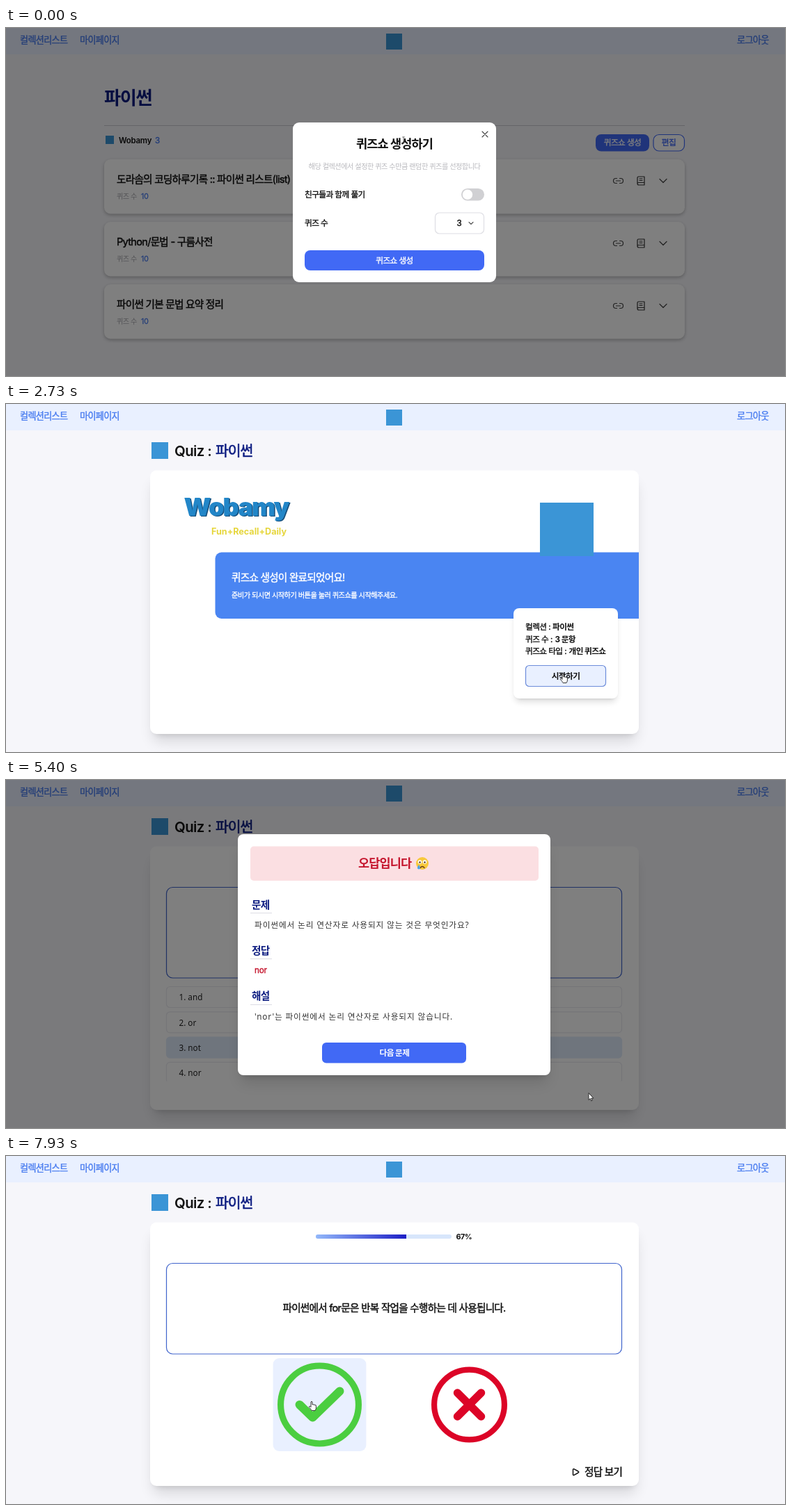
An HTML page with a canvas that plays this animation: 1119x501 px, repeating every 8 s.

```html
<!DOCTYPE html>
<html lang="ko">
<head>
<meta charset="utf-8">
<style>
html, body { margin: 0; width: 100%; height: 100%; overflow: hidden; background: #f6f6fa; }
canvas { display: block; }
</style>
</head>
<body>
<canvas id="stage" width="1119" height="501"></canvas>
<script>
const c = document.getElementById('stage').getContext('2d');
const LOOP = 8000;
const UI = 'Inter, "Noto Sans CJK KR", sans-serif';
const PLAIN = '"Noto Sans", "Noto Sans CJK KR", sans-serif';
const BLUE = '#4169f5', LINK = '#4a7df0', NAVY = '#0b1b80', PALE = '#e9f0ff', EDGE = '#4064cc', MASCOT = '#3b95d6';

// When each screen takes over
const READY = 1330, QUIZ = 2950, ANSWER = 5300, NEXT = 6060;
// When the pointer is over each of the two answer marks
const OVER_X = [6510, 6935], OVER_CHECK = [7070, LOOP + 500];

// Cursor stops: time, x, y of the tip
const stops = [
  [0, 571, 161], [200, 571, 161], [850, 566, 330], [1330, 566, 332], [1800, 775.5, 366.5],
  [2200, 800, 388], [2900, 800, 388], [3470, 663, 370], [3800, 660, 379], [4400, 660, 379],
  [5000, 837, 451], [5430, 837, 451], [5930, 543.5, 384], [6300, 543.5, 384],
  [6700, 645, 360], [6780, 645, 360], [7280, 439, 353], [LOOP, 439, 353]
];
const handTimes = [[800, READY], [2000, 4500], [4930, ANSWER], [5750, NEXT], OVER_X, OVER_CHECK];

const clamp = v => Math.min(1, Math.max(0, v));
const ease = v => { v = clamp(v); return v * v * (3 - 2 * v); };

// Weight 500 is regular type with a thin outline
function text(str, x, y, size, color, o = {}) {
  const { weight = 500, align = 'left', gap = -0.05, font = UI } = o;
  c.font = `${weight === 500 ? 400 : weight} ${size}px ${font}`;
  c.letterSpacing = size * gap + 'px';
  c.textAlign = align;
  c.fillStyle = c.strokeStyle = color;
  c.fillText(str, x, y + size * 0.36);
  if (weight === 500) {
    c.lineWidth = size * 0.03;
    c.lineJoin = 'round';
    c.strokeText(str, x, y + size * 0.36);
  }
}

function box(x0, y0, x1, y1, r, fill, stroke, shadow) {
  c.save();
  c.beginPath();
  c.roundRect(x0, y0, x1 - x0, y1 - y0, r);
  if (shadow) {
    c.shadowColor = `rgba(0,0,0,${shadow[2]})`;
    c.shadowOffsetY = shadow[0];
    c.shadowBlur = shadow[1];
  }
  if (fill) { c.fillStyle = fill; c.fill(); }
  if (stroke) { c.strokeStyle = stroke; c.lineWidth = 1.2; c.stroke(); }
  c.restore();
}

// White panel with a wide and a tight shadow, both pulled in at the sides
function panel(x0, y0, x1, y1, r, lift) {
  for (const [inset, drop, blur] of [[0.25, 1, 1.25], [0.3, 0.4, 0.5]]) {
    const n = inset * lift;
    box(x0 + n, y0 + n, x1 - n, y1 - n, r, '#fff', null, [drop * lift, blur * lift, 0.12]);
  }
  box(x0, y0, x1, y1, r, '#fff');
}

function path(d, x, y, color, width, fill) {
  const p = new Path2D(d);
  c.save();
  c.translate(x, y);
  c.lineCap = c.lineJoin = 'round';
  if (fill) { c.fillStyle = fill; c.fill(p); }
  if (width) { c.strokeStyle = color; c.lineWidth = width; c.stroke(p); }
  c.restore();
}

function disc(x, y, r, fill) {
  c.beginPath();
  c.arc(x, y, r, 0, 7);
  c.fillStyle = fill;
  c.fill();
}

function dim() {
  c.fillStyle = 'rgba(0,0,0,.5)';
  c.fillRect(0, 0, 1119, 501);
}

function page() {
  c.fillStyle = '#f6f6fa';
  c.fillRect(0, 0, 1119, 501);
  c.fillStyle = PALE;
  c.fillRect(0, 0, 1119, 38);
  text('컬렉션리스트', 20, 17, 13.1, LINK);
  text('마이페이지', 106, 17, 13.1, LINK);
  text('로그아웃', 1050, 17, 13.1, LINK);
  box(546, 8, 569, 31, 0, MASCOT);
}

function collection() {
  page();
  text('파이썬', 141, 101, 26.2, NAVY, { weight: 700 });
  c.fillStyle = '#c9c9d0';
  c.fillRect(141, 140, 834, 1);
  box(143, 155, 155, 167, 0, MASCOT);
  text('Wobamy', 162, 161.5, 11.4, '#111', { weight: 600, gap: -0.02 });
  text('3', 214, 161.5, 11.7, LINK);
  box(847, 153, 924, 177.5, 8, BLUE);
  text('퀴즈쇼 생성', 885.5, 165, 11.7, '#fff', { align: 'center' });
  box(930, 153.5, 974.5, 177, 8, '#fff', BLUE);
  text('편집', 952, 165, 11.7, BLUE, { align: 'center' });
  ['도라솜의 코딩하루기록 :: 파이썬 리스트(list)', 'Python/문법 - 구름사전', '파이썬 기본 문법 요약 정리'].forEach((title, i) => {
    const y = 189 + i * 90;
    box(141, y, 975, y + 78.5, 9, '#fff', null, [2, 5, 0.25]);
    text(title, 159, y + 28.5, 14.6, '#111');
    text('퀴즈 수', 159, y + 53, 10.2, '#a8a8ae', { weight: 400 });
    text('10', 194, y + 53, 10.4, LINK, { gap: 0 });
    path('M-2-3.5h-1.5a3.5 3.5 0 0 0 0 7H-2M2-3.5h1.5a3.5 3.5 0 0 1 0 7H2M-3 0H3', 879.5, y + 31, '#444', 1.2);
    path('M-5 4V-4.5Q-5-6-3.5-6H5V6H-3Q-5 6-5 4Q-5 2.5-3 2.5H5M-2-3H2M-2-.5H2', 912, y + 31, '#333', 1.2);
    path('M-5-2.5L0 2.5L5-2.5', 944, y + 31, '#444', 1.2);
  });
  dim();
  box(412, 136, 704, 366, 9, '#fff');
  path('M-4-4L4 4M4-4L-4 4', 688, 153, '#444', 1.1);
  text('퀴즈쇼 생성하기', 558, 167, 17.5, '#111', { weight: 700, align: 'center' });
  text('해당 컬렉션에서 설정한 퀴즈 수만큼 랜덤한 퀴즈를 선정합니다', 558, 199.5, 10.2, '#b9b9be', { weight: 400, align: 'center' });
  text('친구들과 함께 풀기', 429, 239.5, 11.7, '#111');
  box(654, 231, 687, 248.5, 9, '#d0d0d3');
  disc(663, 239.8, 7.2, '#fff');
  text('퀴즈 수', 429, 281, 11.7, '#111');
  box(616.5, 266, 686.5, 296, 6, '#fff', '#dedee4');
  text('3', 651, 281, 11.7, '#111', { align: 'center', gap: 0 });
  path('M-3-1.5L0 1.5L3-1.5', 668, 281, '#555', 1.1);
  box(429, 320, 687, 349, 8, BLUE);
  text('퀴즈쇼 생성', 558, 334.5, 11.7, '#fff', { align: 'center' });
}

function quizFrame() {
  page();
  box(209, 55, 233, 79, 0, MASCOT);
  text('Quiz :', 242, 68, 20.4, '#111', { weight: 600, gap: -0.03 });
  text('파이썬', 301, 68, 20.4, NAVY);
  panel(207, 95.5, 909, 475, 9, 15);
}

function ready() {
  quizFrame();
  const big = { weight: 900 };
  text('Wobamy', 257, 149.5, 36, '#174f7c', big);
  text('Wobamy', 255.5, 148, 36, '#2286c8', big);
  text('Fun+Recall+Daily', 349, 183, 12.6, '#e6d63c', { weight: 700, align: 'center', gap: 0 });
  box(300.5, 213.5, 909, 309, [9, 0, 0, 9], '#4a85f2');
  box(767, 142, 844, 219, 0, MASCOT);
  text('퀴즈쇼 생성이 완료되었어요!', 324, 250, 14.6, '#fff');
  text('준비가 되시면 시작하기 버튼을 눌러 퀴즈쇼를 시작해주세요.', 324, 275, 10.2, '#fff');
  panel(729, 294, 879, 424, 8, 7);
  [['컬렉션 :', '파이썬', 785], ['퀴즈 수 :', '3 문항', 788.5], ['퀴즈쇼 타입 :', '개인 퀴즈쇼', 808.5]].forEach(([name, value, x], i) => {
    const y = 321 + i * 17.5;
    text(name, 746, y, 11.7, '#111');
    text(value, x, y, 11.7, '#111', { weight: 700 });
  });
  box(746.5, 376.5, 861.5, 406.5, 5, PALE, '#6c8cda');
  text('시작하기', 804, 391.5, 11.7, '#111', { weight: 700, align: 'center' });
}

function question(label, share, body, showAnswerLink) {
  quizFrame();
  c.save();
  c.beginPath();
  c.roundRect(445, 113, 195, 6, 3);
  c.clip();
  c.fillStyle = '#d8e6fb';
  c.fillRect(445, 113, 195, 6);
  const width = 195 * share, g = c.createLinearGradient(445, 0, 445 + width, 0);
  g.addColorStop(0, '#93b8fa');
  g.addColorStop(1, '#1d1fc6');
  c.fillStyle = g;
  c.fillRect(445, 113, width, 6);
  c.restore();
  text(label, 646.5, 116.5, 10.8, '#111', { weight: 700 });
  box(230.5, 154.5, 884.5, 285, 9, '#fff', EDGE);
  text(body, 557.5, 219, 14.6, '#111', { align: 'center' });
  if (showAnswerLink) {
    path('M-4-3.5Q-4-5-2.5-4.4L3.5-1Q5 0 3.5 1L-2.5 4.4Q-4 5-4 3.5Z', 818.5, 455, '#111', 1.5);
    text('정답 보기', 831, 455, 14.6, '#111');
  }
}

function choices(showAnswerLink) {
  question('33%', 1 / 3, '파이썬에서 논리 연산자로 사용되지 않는 것은 무엇인가요?', showAnswerLink);
  c.save();
  c.beginPath();
  c.rect(225, 290, 670, 143.5);
  c.clip();
  ['and', 'or', 'not', 'nor'].forEach((word, i) => {
    const y = 297.5 + i * 36.3, picked = i === 2;
    box(230.5, y, 884.5, y + 30, 5, picked ? '#e0ebfb' : '#fff', picked ? '#e0ebfb' : '#ebebf1');
    text(`${i + 1}. ${word}`, 248.5, y + 15.7, 11.7, '#222', { weight: 400, gap: 0, font: PLAIN });
  });
  c.restore();
}

function answer() {
  choices(false);
  dim();
  panel(333, 78, 782, 425, 8, 15);
  box(351, 95.5, 765, 145, 5, '#fbdfe2');
  text('오답입니다', 506, 120, 17.5, '#c5162e', { weight: 700 });
  disc(598, 120, 9, '#f8c93c');
  for (const x of [594.5, 601.5]) {
    disc(x, 118, 2.8, '#fff');
    disc(x, 118.5, 1.3, '#5a3a20');
  }
  path('M-3 2Q0-2 3 2', 598, 124.5, '#6b3e1c', 1.4);
  path('M0-3Q4 3 0 3.5Q-4 3 0-3', 593, 125, '', 0, '#4aa3e8');
  const body = { weight: 400, gap: 0.075, font: PLAIN };
  ['문제', '정답', '해설'].forEach((name, i) => {
    const y = 179.5 + i * 65.8;
    text(name, 353, y, 14.6, NAVY, { weight: 700 });
    c.fillStyle = '#dcdce4';
    c.fillRect(351, Math.round(y + 11.5), 31, 1);
  });
  text('파이썬에서 논리 연산자로 사용되지 않는 것은 무엇인가요?', 357, 208.5, 11.7, '#333', body);
  text('nor', 357, 274, 11.7, '#c5162e', { gap: -0.02 });
  text("'nor'는 파이썬에서 논리 연산자로 사용되지 않습니다.", 357, 340.5, 11.7, '#333', body);
  box(454, 378, 661, 407.5, 6, BLUE);
  text('다음 문제', 558, 393, 11.7, '#fff', { weight: 700, align: 'center' });
}

function mark(x, color, d, width, t, [from, to]) {
  const scale = 1 + 0.11 * (ease((t - from) / 150) - ease((t - to) / 150));
  c.save();
  c.translate(x, 358);
  c.scale(scale, scale);
  if (t >= from && t < to) box(-60.3, -60.3, 60.3, 60.3, 8, PALE);
  path('M-50.4 0A50.4 50.4 0 1 1 50.4 0A50.4 50.4 0 1 1-50.4 0Z', 0, 0, color, 8.2);
  path(d, 0, 0, color, width);
  c.restore();
}

function trueFalse(t) {
  question('67%', (1 + ease((t - 6070) / 500)) / 3, '파이썬에서 for문은 반복 작업을 수행하는 데 사용됩니다.', true);
  mark(450.5, '#4bce40', 'M-26 0L-9 16.5L26-17.5', 11, t, OVER_CHECK);
  mark(665.5, '#dc0427', 'M-17-17L17 17M17-17L-17 17', 11.5, t, OVER_X);
}

function cursor(t) {
  const i = Math.max(1, stops.findIndex(s => s[0] > t));
  const [t0, x0, y0] = stops[i - 1], [t1, x1, y1] = stops[i];
  const k = ease((t - t0) / (t1 - t0));
  const x = x0 + (x1 - x0) * k, y = y0 + (y1 - y0) * k;
  if (t < 320) path('M-1.5-4H1.5M0-4V4M-1.5 4H1.5', x, y, '#555', 0.8);
  else if (handTimes.some(([a, b]) => t >= a && t < b))
    path('M-1 8V1Q0-.5 1 1V5Q2 4 3 5.2Q4 4.4 5 5.6Q6.4 5 6.4 7V10Q6.2 12 5 13.5H0Q-1 12.5-1 11.5L-3.8 8.3Q-3.5 6.6-2 7.4Z', x, y, '#222', 0.9, '#fff');
  else path('M0 0V9.6L2.2 7.6L3.7 11L5.2 10.3L3.7 7.1H6.5Z', x, y, '#222', 0.9, '#fff');
}

function draw(now) {
  const t = now % LOOP;
  if (t < READY) collection();
  else if (t < QUIZ) ready();
  else if (t < ANSWER) choices(true);
  else if (t < NEXT) answer();
  else trueFalse(t);
  cursor(t);
  requestAnimationFrame(draw);
}
requestAnimationFrame(draw);
</script>
</body>
</html>
```
